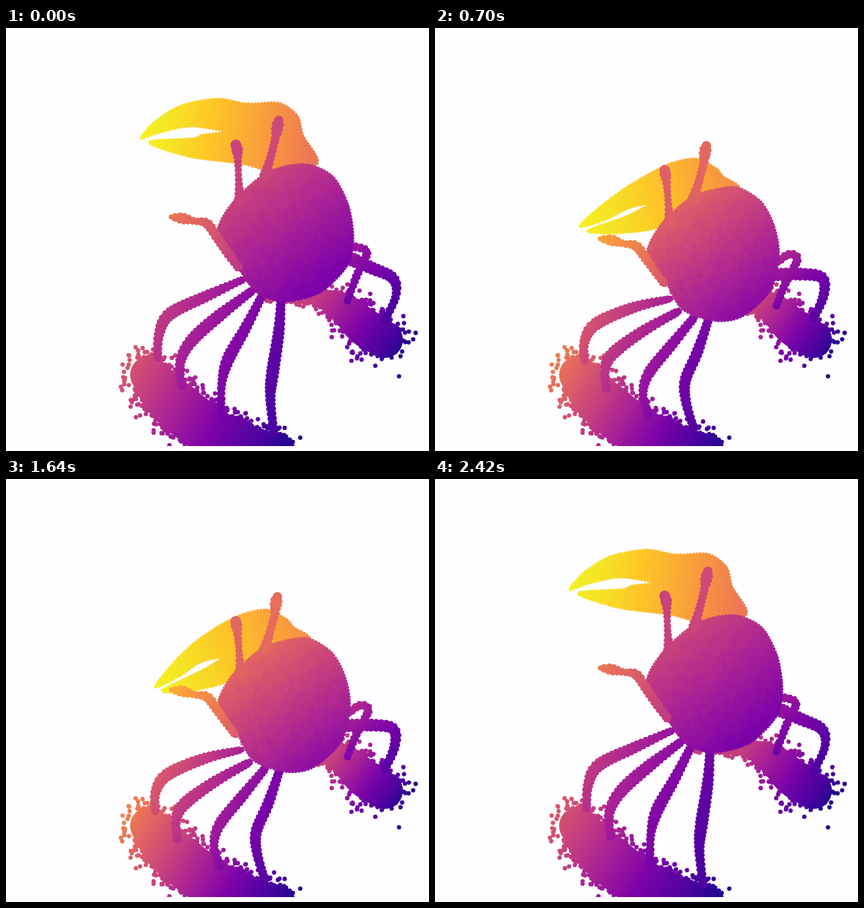
Animation of 600x600 px, one loop 2450 ms. Source, as an HTML page with a canvas:

```html
<!DOCTYPE html>
<html lang="en">
<head>
<meta charset="utf-8">
<title>Waving crab</title>
<style>
html, body { margin: 0; width: 100%; height: 100%; overflow: hidden; background: #fefdff; }
canvas { display: block; width: 600px; height: 600px; }
</style>
</head>
<body>
<canvas id="stage" width="600" height="600"></canvas>
<script>
const ctx = document.getElementById('stage').getContext('2d');
const LOOP = 2450, HALF = 1210, LOW = 850, BENT = 510, TUCKED = 210;
const TAU = Math.PI * 2;

let seed = 11;
const rnd = () => {
  seed = (seed * 1664525 + 1013904223) % 4294967296;
  return seed / 4294967296;
};
const mix = (a, b, p) => a + (b - a) * p;
const mixAll = (a, b, p) => a.map((v, i) => mix(v, b[i], p));
const smooth = p => p * p * (3 - 2 * p);
const clamp = v => Math.min(1, Math.max(0, v));

// Depth colours, far to near
const RAMP = [[13, 8, 135], [76, 2, 161], [126, 3, 168], [170, 35, 149], [204, 71, 120],
  [230, 108, 92], [248, 149, 64], [253, 197, 39], [240, 249, 33]];
function shade(v) {
  const x = clamp(v) * 8, i = Math.min(7, Math.floor(x));
  return `rgb(${mixAll(RAMP[i], RAMP[i + 1], x - i).map(Math.round)})`;
}
function depth([x0, y0, v0, x1, y1, v1], k = 1, dy = 0, bend = 1) {
  const g = ctx.createLinearGradient(x0, y0 + dy, x1, y1 + dy);
  for (let i = 0; i <= 10; i++)
    g.addColorStop(i / 10, shade(k * mix(v0, v1, (i / 10) ** bend)));
  return g;
}

function dot(path, x, y, r) {
  path.moveTo(x + r, y);
  path.arc(x, y, r, 0, TAU);
}

// Closed smooth curve through flat x,y pairs
function blob(pts) {
  const n = pts.length / 2, path = new Path2D();
  const at = i => { const j = (i + n) % n * 2; return [pts[j], pts[j + 1]]; };
  path.moveTo(pts[0], pts[1]);
  for (let i = 0; i < n; i++) {
    const [a, b, c, d] = [at(i - 1), at(i), at(i + 1), at(i + 2)];
    path.bezierCurveTo(b[0] + (c[0] - a[0]) / 7, b[1] + (c[1] - a[1]) / 7,
      c[0] - (d[0] - b[0]) / 7, c[1] - (d[1] - b[1]) / 7, c[0], c[1]);
  }
  path.closePath();
  return path;
}
function fillBlob(pts, paint) {
  const path = blob(pts);
  ctx.fillStyle = ctx.strokeStyle = paint;
  ctx.fill(path);
  ctx.stroke(path);
}

// Catmull-Rom samples along flat x,y,r triples
function walk(pts, step, visit) {
  const n = pts.length / 3;
  const at = i => pts.slice(3 * Math.min(n - 1, Math.max(0, i))).slice(0, 3);
  for (let i = 0; i < n - 1; i++) {
    const [a, b, c, d] = [at(i - 1), at(i), at(i + 1), at(i + 2)];
    const m = Math.max(1, Math.round(Math.hypot(c[0] - b[0], c[1] - b[1]) / step));
    for (let j = 0; j < m; j++) {
      const t = j / m;
      visit(...b.map((q, e) => q + t * ((c[e] - a[e]) / 2 +
        t * (a[e] - 2.5 * q + 2 * c[e] - d[e] / 2 + t * (1.5 * (q - c[e]) + (d[e] - a[e]) / 2)))));
    }
  }
  visit(...at(n - 1));
}
function fillLimb(pts, paint) {
  const path = new Path2D();
  let px, py, flip = 0;
  walk(pts, 3, (x, y, r) => {
    dot(path, x, y, r - 0.8);
    if (px !== undefined && flip++ % 2) {
      const a = Math.atan2(y - py, x - px), e = Math.max(0, r - 2.6);
      const dx = -Math.sin(a) * e, dy = Math.cos(a) * e;
      dot(path, x + dx, y + dy, 3);
      dot(path, x - dx, y - dy, 3);
    }
    px = x; py = y;
  });
  ctx.fillStyle = paint;
  ctx.fill(path);
}

function sand(spine, count) {
  const path = new Path2D(), beads = [];
  walk(spine, 5, (x, y, r) => { beads.push([x, y, r]); dot(path, x, y, r * 0.93); });
  for (let i = 0; i < count; i++) {
    const [x, y, r] = beads[Math.floor(rnd() * beads.length)];
    const a = rnd() * TAU, d = r * 0.9 + Math.min(20, r * 0.75) * rnd() ** 2.2;
    dot(path, x + Math.cos(a) * d, y + Math.sin(a) * d, 3.1);
  }
  return path;
}
const nearSand = sand([203, 492, 29, 235, 530, 37, 295, 575, 37, 350, 596, 33, 385, 602, 28], 640);
const farSand = sand([370, 379, 5, 435, 382, 11, 475, 395, 22, 508, 424, 29, 537, 442, 28], 380);
dot(farSand, 557.5, 494, 3.1);
dot(farSand, 577.5, 441.5, 3.1);
dot(farSand, 490, 472, 3.1);

// Faint mottling of the shell
const grain = [1, -1].map(sign => {
  const path = new Path2D();
  for (let i = 0; i < 130; i++) {
    const a = rnd() * TAU, d = 82 * Math.sqrt(rnd());
    dot(path, 400 + Math.cos(a) * d, 293 + Math.sin(a) * d, 2 + rnd() * 2);
  }
  return { sign, path };
});

// Claw outlines: raised, lowered, bent, tucked
const raised = { k: 1, far: 0.66, pts: [192, 156, 213, 132, 250, 110, 300, 101, 342, 108, 387, 107,
  413, 125, 421, 153, 441, 192, 382, 203, 335, 192, 260, 182, 203, 162, 266, 157, 279, 152,
  311, 147, 262, 139, 217, 148] };
const lowered = { k: 1.09, far: 0.69, pts: [195, 217, 217, 195, 253, 179, 300, 171, 340, 175, 374, 174,
  401, 189, 409, 210, 430, 227, 390, 245, 330, 254, 262, 243, 205, 223, 268, 218, 282, 214,
  306, 211, 258, 207, 222, 212] };
const bent = { k: 1.2, far: 0.72, pts: [206, 281, 233, 255, 268, 229, 303, 208, 336, 192, 371, 186,
  399, 200, 408, 211, 430, 227, 390, 250, 318, 282, 264, 290, 217, 288, 268, 269, 283, 262,
  306, 249, 275, 255, 240, 272] };
const tucked = { k: 1.32, far: 0.74, pts: [224, 321, 236, 286, 258, 247, 298, 212, 336, 193, 369, 186,
  397, 200, 408, 211, 430, 227, 390, 250, 318, 292, 272, 317, 230, 325, 264, 294, 289, 280,
  311, 260, 277, 268, 258, 292] };

const bodyLow = [301, 322, 322, 278, 362, 242, 400, 229, 430, 227, 462, 247, 480, 280,
  487, 320, 476, 370, 438, 407, 400, 415, 352, 399, 328, 360];
const bodyHigh = [301, 292, 322, 248, 365, 209, 400, 196, 432, 195, 464, 212, 485, 252,
  492, 298, 484, 336, 446, 374, 396, 387, 358, 376, 334, 346];

// Gradient axes: x, y, value at both ends
const NEAR_SAND = [175, 462, 0.56, 395, 593, 0.05];
const FAR_SAND = [445, 370, 0.47, 562, 455, 0.05];
const SHELL = [330, 225, 0.5, 450, 380, 0.22];
const FRONT = [210, 390, 0.48, 400, 485, 0.13];
const BACK = [495, 310, 0.33, 555, 385, 0.13];
const PINCER = [232, 265, 0.66, 325, 335, 0.46];
const EYE = [320, 200, 0.48, 395, 170, 0.51];

const limb = (axis, high, low) => ({ axis, high, low });
const behind = [
  limb(BACK, [490, 310, 6, 503, 312, 6, 512, 320, 6, 498, 350, 6, 484, 388, 5],
    [486, 332, 6, 502, 321, 6, 514, 328, 6, 497, 362, 6, 484, 395, 5]),
  limb(BACK, [488, 327, 10, 520, 341, 9, 549, 355, 8, 553, 380, 6, 537, 415, 6],
    [482, 350, 9, 515, 349, 9, 549, 354, 8, 551, 380, 7, 537, 412, 6])
];
const legs = [
  limb(FRONT, [338, 356, 5, 285, 380, 8, 232, 406, 9, 217, 435, 7, 215, 468, 6],
    [334, 384, 5, 280, 397, 8, 228, 420, 9, 212, 445, 7, 212, 472, 6]),
  limb(FRONT, [350, 372, 6, 300, 410, 9, 262, 445, 9, 247, 475, 7, 249, 508, 6],
    [345, 402, 6, 295, 430, 8, 252, 462, 9, 241, 485, 7, 243, 512, 6]),
  limb(FRONT, [363, 380, 6, 340, 425, 8, 315, 470, 9, 306, 505, 6, 305, 545, 6],
    [368, 410, 6, 335, 450, 8, 303, 490, 8, 295, 520, 6, 303, 550, 6]),
  limb(FRONT, [390, 385, 6, 387, 430, 8, 378, 490, 9, 375, 525, 7, 380, 575, 6],
    [388, 413, 6, 372, 460, 8, 355, 500, 8, 356, 530, 7, 366, 565, 6])
];
const pincer = limb(PINCER, [234, 268, 4, 250, 270, 8, 268, 274, 5, 285, 277, 7, 298, 295, 7, 314, 318, 7, 330, 340, 6],
  [234, 299, 4, 250, 301, 8, 268, 306, 5, 285, 309, 7, 297, 324, 7, 311, 344, 6, 325, 362, 6]);
const eyes = [
  limb(EYE, [326, 166, 8.5, 328, 173, 8, 329, 187, 5.5, 330, 215, 5, 332, 245, 8],
    [326, 202, 8.5, 327, 208, 8, 329, 224, 5.5, 331, 250, 5, 333, 275, 8]),
  limb(EYE, [387, 131, 7.5, 385, 141, 8.5, 382, 157, 6, 375, 185, 6, 367, 211, 8],
    [385, 167, 7.5, 383, 176, 8.5, 381, 193, 6, 375, 215, 6, 367, 242, 8])
];

const between = (a, b, p) => ({
  k: mix(a.k, b.k, p), far: mix(a.far, b.far, p), pts: mixAll(a.pts, b.pts, p)
});

function draw(time) {
  // The second half runs the first one backwards
  const u = Math.min(HALF, Math.abs(time % LOOP - HALF));
  const lift = smooth(clamp((u - LOW) / (HALF - LOW)));
  const fold = u < BENT ? (BENT ** 2 - u ** 2) / (BENT ** 2 - TUCKED ** 2) : 0;
  const lean = -3 * Math.max(0, (fold - 0.4) / 0.6);
  const claw = u > LOW ? between(lowered, raised, lift)
    : u > BENT ? between(bent, lowered, (u - BENT) / (LOW - BENT))
    : between(bent, tucked, fold);
  const { k, pts } = claw, drop = 30 * (1 - lift);

  const put = ({ axis, high, low }, dx = 0, dy = 0) => {
    const spine = mixAll(low, high, lift).map((v, i) => i % 3 ? v : v + dx);
    fillLimb(spine, depth(axis, k, dy));
  };

  ctx.clearRect(0, 0, 600, 600);
  ctx.save();
  ctx.beginPath();
  ctx.rect(0, 0, 600, 593);
  ctx.clip();
  ctx.lineCap = 'round';
  ctx.lineWidth = 4.5;
  ctx.setLineDash([0.01, 4.5]);

  ctx.fillStyle = depth(FAR_SAND, k);
  ctx.fill(farSand);
  ctx.fillStyle = depth(NEAR_SAND, k);
  ctx.fill(nearSand);
  behind.forEach(l => put(l));
  fillBlob(pts, depth([pts[0], pts[1], 0.98, 432, pts[17] - 8, claw.far], 1, 0, 1.25));
  legs.forEach(l => put(l));
  fillBlob(mixAll(bodyLow, bodyHigh, lift), depth(SHELL, k, drop));

  ctx.save();
  ctx.translate(-5 * (1 - lift), drop);
  ctx.globalAlpha = 0.5;
  for (const { sign, path } of grain) {
    const [x0, y0, v0, x1, y1, v1] = SHELL;
    ctx.fillStyle = depth([x0, y0, v0 + sign * 0.02, x1, y1, v1 + sign * 0.02], k);
    ctx.fill(path);
  }
  ctx.restore();

  eyes.forEach(l => put(l, lean, drop));
  put(pincer, lean / 3, drop);
  ctx.restore();
}

function tick() {
  draw(performance.now());
  requestAnimationFrame(tick);
}
tick();
</script>
</body>
</html>
```
